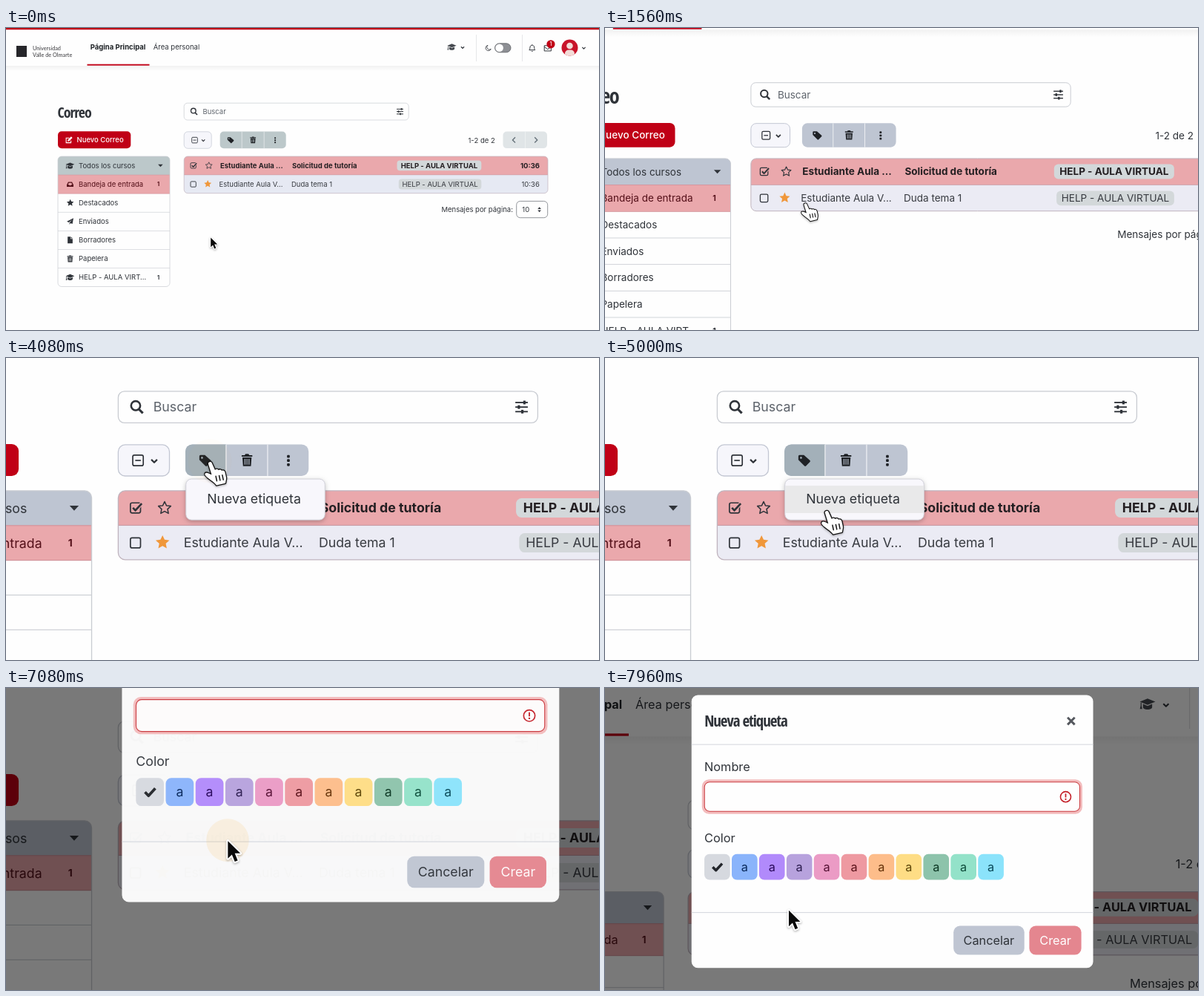
An HTML page with a canvas for the animation above (8 s loop, 800 by 407 pixels).

```html
<!DOCTYPE html>
<html lang="es">
<head>
<meta charset="utf-8">
<title>Correo</title>
<style>
html, body { margin: 0; width: 100%; height: 100%; overflow: hidden; background: #fefefe; }
canvas { display: block; width: 800px; height: 407px; }
</style>
</head>
<body>
<canvas id="stage"></canvas>
<script>
const W = 800, H = 407, LOOP = 8000;
const canvas = document.getElementById('stage');
const ctx = canvas.getContext('2d');
const dpr = window.devicePixelRatio || 1;
canvas.width = W * dpr;
canvas.height = H * dpr;

const RED = '#c00016', INK = '#2f3339', PINK = '#eaa8ac', LINE = '#c9ccd2';
const SANS = 'Inter, "Open Sans", sans-serif';
const NARROW = '"Open Sans Condensed", "Roboto Condensed", Roboto, sans-serif';
const ROW = 25.07, TOP = 173;

// Icons on a 16 x 16 grid
const ICONS = {
  cap: 'M8 2 16.5 5.5 8 9-.5 5.5zM3 8v3.5c0 1.2 2 2.5 5 2.5s5-1.3 5-2.5V8l-5 2.2zM.4 6.5h1V10l.8 3.5H-.4L.4 10z',
  inbox: 'M3.5 2.5h9L16 9v5H0V9zM5 4.5 2.6 9h3l1 2h2.8l1-2h3L11 4.5z',
  plane: 'M16 0 13.5 14 8.8 12 6.5 15.5V11L13 3.5 5 10.2 0 8.2z',
  file: 'M2 0h7v5h5v11H2zM10 0l4 4h-4z',
  trash: 'M1 1.6h4L6 0h4l1 1.6h4v2H1zM2 4.6h12L13.2 16H2.8zM4.8 6.5v7.5h1.1V6.5zM7.4 6.5v7.5h1.1V6.5zM10.1 6.5v7.5h1.1V6.5z',
  tag: 'M0 2.5V7.2L8 15.2q1 .9 2 0L15.2 10q.9-1 0-2L7.2 1H1.5Q0 1 0 2.5zM3.5 3.2a1.3 1.3 0 1 1-.01 0z',
  edit: 'M1 3h7.5v1.7H2.7v8.6h8.6V9.5H13V15H1zM12.6.8 15.4 3.6 8.4 10.6 5 11.2 5.6 7.8z',
  moon: 'M7 1a7 7 0 1 0 8 9.5A6 6 0 0 1 7 1z',
  bell: 'M8 1v1.2M2 12c2-2 1.3-5 2-7 .6-1.8 2-2.8 4-2.8s3.4 1 4 2.8c.7 2 0 5 2 7zM6.5 14c.5 1.3 2.5 1.3 3 0',
  mail: 'M1 3h14v11H1zM1 5.5l7 5 7-5',
  check: 'M2 8.5 6.3 13 14.5 4'
};
for (const k in ICONS) ICONS[k] = new Path2D(ICONS[k]);

const ARROW = new Path2D('M.2.6V13.2L3.100 10.400 5.200 15.500 7.300 14.600 5.200 9.500H9.200z');
const HAND = new Path2D('M-1.1 2.2C-1.5.7.7-.1 1.4 1.3L3.7 6.4C4.5 5.5 5.8 5.7 6.2 6.6 6.9 5.8 8.2 6 8.6 7 9.5 6.4 10.6 6.9 10.9 8L11.700 11.500C12 13.100 11.400 14.200 11.200 15.900L4.800 17.400C3.500 15.500.9 14.100-1.300 12.200-2.700 11-4.100 9.800-3.400 8.800-2.600 7.800-.9 8.800 1.300 9.800z');
const FINGERS = new Path2D('M4.300 10.900 5 14.300M6.700 10.500 7.400 13.900M9 10.100 9.700 13.500');

const clamp = v => Math.max(0, Math.min(1, v));
const ease = v => { v = clamp(v); return v * v * (3 - 2 * v); };
const mix = (a, b, p) => a + (b - a) * p;
const mixAll = (a, b, p) => a.map((v, i) => mix(v, b[i], p));

function text(str, x, y, { size = 9.5, weight = 400, color = INK, align = 'left', font } = {}) {
  ctx.font = font || `${weight} ${size}px ${SANS}`;
  ctx.textAlign = align;
  ctx.fillStyle = color;
  ctx.fillText(str, x, y);
}
function title(str, x, y, size) {
  ctx.letterSpacing = -size * 0.05 + 'px';
  text(str, x, y, { font: `400 ${size}px ${NARROW}` });
  ctx.letterSpacing = '0px';
}
function box(x, y, w, h, r, fill, stroke, lw = 0.7) {
  ctx.beginPath();
  ctx.roundRect(x, y, w, h, r);
  if (fill) { ctx.fillStyle = fill; ctx.fill(); }
  if (stroke) { ctx.strokeStyle = stroke; ctx.lineWidth = lw; ctx.stroke(); }
}
function rect(x, y, w, h, fill) {
  ctx.fillStyle = fill;
  ctx.fillRect(x, y, w, h);
}
function disc(x, y, r, fill) {
  ctx.beginPath();
  ctx.arc(x, y, r, 0, 7);
  ctx.fillStyle = fill;
  ctx.fill();
}
function line(pts, color = INK, lw = 1) {
  ctx.beginPath();
  for (let i = 0; i < pts.length; i += 2) ctx.lineTo(pts[i], pts[i + 1]);
  ctx.strokeStyle = color;
  ctx.lineWidth = lw;
  ctx.stroke();
}
function icon(name, x, y, size, color = INK, lw = 0) {
  ctx.save();
  ctx.translate(x - size / 2, y - size / 2);
  ctx.scale(size / 16, size / 16);
  ctx.fillStyle = ctx.strokeStyle = color;
  ctx.lineWidth = lw;
  if (lw) ctx.stroke(ICONS[name]);
  else ctx.fill(ICONS[name], 'evenodd');
  ctx.restore();
}
function star(x, y, r, fill, stroke) {
  ctx.beginPath();
  for (let i = 0; i < 10; i++) {
    const a = i * Math.PI / 5 - Math.PI / 2, d = i % 2 ? r * 0.48 : r;
    ctx.lineTo(x + d * Math.cos(a), y + d * Math.sin(a));
  }
  ctx.closePath();
  ctx.lineJoin = 'round';
  if (fill) { ctx.fillStyle = fill; ctx.fill(); }
  if (stroke) { ctx.strokeStyle = stroke; ctx.lineWidth = 0.8; ctx.stroke(); }
}
const chevron = (x, y, r = 2.1) => line([x - r, y - r / 2, x, y + r / 2, x + r, y - r / 2], INK, 1.2);
function triangle(x, y, w, h, color = INK) {
  ctx.beginPath();
  ctx.moveTo(x - w / 2, y - h / 2);
  ctx.lineTo(x + w / 2, y - h / 2);
  ctx.lineTo(x, y + h / 2);
  ctx.fillStyle = color;
  ctx.fill();
}

function drawHeader() {
  const g = ctx.createLinearGradient(0, 51, 0, 58);
  g.addColorStop(0, 'rgba(0,0,0,.05)');
  g.addColorStop(1, 'rgba(0,0,0,0)');
  rect(0, 51, W, 7, g);
  rect(0, 0, W, 2.2, RED);

  rect(14, 24, 14, 15, '#26262a');
  const small = { font: '400 7.3px Lato, sans-serif', color: '#3a3a3e' };
  text('Universidad', 36, 30.3, small);
  text('Valle de Olmarte', 36, 39.3, small);

  text('Página Principal', 113.7, 29, { weight: 700, color: '#1d2125' });
  text('Área personal', 198.7, 29);
  rect(109.5, 48.7, 84, 1.9, RED);

  icon('cap', 601.5, 25.5, 11.5, '#45494f');
  chevron(616, 26.3);
  rect(634.2, 9, 0.7, 36, '#dcdde0');
  rect(696.2, 9, 0.7, 36, '#dcdde0');
  icon('moon', 650.5, 27, 8.5, INK, 1.5);
  box(659.5, 20.8, 21.5, 12, 6, '#8d8f94', '#5b5e63', 0.8);
  disc(665.6, 26.8, 5.3, '#fff');
  icon('bell', 709.8, 27, 10.5, INK, 1.5);
  icon('mail', 730.8, 27, 10.5, INK, 1.5);
  disc(735, 21.8, 5.6, RED);
  text('1', 735, 24.4, { size: 7, weight: 500, color: '#fff', align: 'center' });

  disc(760.5, 26.5, 11, '#c8142a');
  ctx.save();
  ctx.beginPath();
  ctx.arc(760.5, 26.5, 11, 0, 7);
  ctx.clip();
  disc(760.5, 24, 4.3, '#f3dcd8');
  box(754, 29.5, 13, 12, 5, '#f3dcd8');
  ctx.restore();
  chevron(779.5, 27);
}

function drawSidebar(tone) {
  const items = [
    ['cap', 'Todos los cursos'], ['inbox', 'Bandeja de entrada', '1'], ['star', 'Destacados'],
    ['plane', 'Enviados'], ['file', 'Borradores'], ['trash', 'Papelera'],
    ['cap', 'HELP - AULA VIRT...', '1']
  ];
  box(70, TOP, 151, ROW * 7, 5, '#fefefe');
  box(70, TOP, 151, ROW, [5, 5, 0, 0], tone);
  rect(70, TOP + ROW, 151, ROW, PINK);
  items.forEach(([name, label, count], i) => {
    const y = TOP + ROW * (i + 0.5), color = i === 1 ? '#541019' : INK;
    if (i) rect(70, y - ROW / 2 - 0.3, 151, 0.6, i < 3 ? '#d18f97' : LINE);
    if (name === 'star') star(86.7, y, 5, color);
    else icon(name, 86.5, y, name === 'cap' ? 11 : 9, color);
    text(label, 98, y + 3.4, { color });
    if (count) text(count, 205.6, y + 2.7, { size: 7.4, weight: 700, color, align: 'center' });
  });
  triangle(208.4, TOP + ROW / 2, 6.6, 3.6);
  box(70, TOP, 151, ROW * 7, 5, null, LINE);
}

function drawToolbar(tone, pressed) {
  box(240.2, 101.2, 303, 22.8, 4.5, '#fefefe', LINE);
  ctx.beginPath();
  ctx.arc(252.8, 111.6, 3.3, 0, 7);
  ctx.strokeStyle = INK;
  ctx.lineWidth = 1.4;
  ctx.stroke();
  line([255, 114, 258, 117], INK, 1.7);
  text('Buscar', 265.5, 116, { color: '#5d636b' });
  [[109.3, 2], [112.6, -2], [115.9, 0.5]].forEach(([y, d]) => {
    line([527, y, 536, y], INK, 1);
    rect(530.7 + d, y - 1.3, 1.7, 2.6, INK);
  });

  box(70, 139.3, 98.3, 23, 5, RED);
  icon('edit', 85, 150.8, 10, '#fff');
  text('Nuevo Correo', 95.5, 154.4, { weight: 500, color: '#fff' });

  box(240.2, 139.8, 37, 22.5, 5, '#f6f6fb', '#c3c7d3');
  box(250.7, 147.3, 7.6, 7.6, 1.2, null, INK, 0.9);
  line([252.5, 151.1, 256.5, 151.1], INK, 0.9);
  chevron(266.2, 151.5);

  box(288.7, 139.6, 89, 22.7, 5, tone);
  if (pressed) box(288.7, 139.6, 29.4, 22.7, [5, 0, 0, 5], '#a3b0b9');
  rect(317.8, 139.6, 0.6, 22.7, '#f4f5f7');
  rect(347.8, 139.6, 0.6, 22.7, '#f4f5f7');
  icon('tag', 303.2, 151.1, 8.8, '#1f2226');
  icon('trash', 333.2, 150.8, 8.8, '#1f2226');
  for (const d of [-3, 0, 3]) box(362.1, 150.2 + d, 2, 2, 0.6, '#1f2226');

  text('1-2 de 2', 623.5, 154.5);
  box(670.5, 139.5, 59.5, 22.6, 5, '#e0e5e7');
  rect(700, 139.5, 0.6, 22.6, '#f4f5f7');
  line([687, 147.3, 683.4, 150.9, 687, 154.5], '#66727a', 1.4);
  line([713.2, 147.3, 716.8, 150.9, 713.2, 154.5], '#66727a', 1.4);
}

function drawTable(early) {
  const h = 49.7, mid = 197.9;
  box(240.2, TOP, 490.8, mid - TOP, [5, 5, 0, 0], PINK);
  box(240.2, mid, 490.8, TOP + h - mid, [0, 0, 5, 5], early ? '#e6e9f3' : '#ebebf4');
  rect(240.2, mid - 0.3, 490.8, 0.6, '#c79aa3');
  box(240.2, TOP, 490.8, h, 5, null, '#c0b4be');

  const rows = [
    { y: 185.3, who: ['Estudiante Aula ...', 289], what: ['Solicitud de tutoría', 386], tagX: 527.5, hour: 694, weight: 700, color: '#241f22' },
    { y: 210.5, who: ['Estudiante Aula V...', 287.5], what: ['Duda tema 1', 385], tagX: 529.8, hour: 695.5, weight: 400, color: '#383b41' }
  ];
  rows.forEach((r, i) => {
    box(249, r.y - 3.6, 7.3, 7.3, 1.2, null, INK, 0.9);
    if (i === 0) {
      const tick = [250.8, 185.2, 252.6, 187.2, 257.2, 182.2];
      line(tick, PINK, 2.6);
      line(tick, INK, 1.4);
      star(273.7, r.y + 0.2, 4.7, null, INK);
    } else star(272.2, r.y - 0.2, 5.2, '#f0973a');
    const style = { weight: r.weight, color: r.color }, base = r.y + 3.3;
    text(...r.who, base, style);
    text(...r.what, base, style);
    box(r.tagX, r.y - 6.9, 641.3 - r.tagX, 13.9, 4, '#d3d8da');
    text('HELP - AULA VIRTUAL', (r.tagX + 641.3) / 2, base, { ...style, align: 'center' });
    text('10:36', r.hour, base, style);
  });

  text('Mensajes por página:', 587.5, 248.2);
  box(688.7, 233.4, 42, 22.3, 5, '#fefefe', '#777b82', 0.8);
  text('10', 696.3, 248.2);
  triangle(719.6, 242.6, 4.6, -2.8);
  triangle(719.6, 246.8, 4.6, 2.8);
}

function shadow(color, blur, y) {
  ctx.shadowColor = color;
  ctx.shadowBlur = blur * dpr;
  ctx.shadowOffsetY = y * dpr;
}

function drawMenu(hover) {
  ctx.save();
  shadow('rgba(0,0,0,.28)', 6, 2);
  box(289.1, 164.5, 100.4, 29.5, 4, '#f8f7fc');
  ctx.restore();
  box(289.1, 164.5, 100.4, 29.5, 4, null, '#cfcfd8', 0.5);
  if (hover) rect(289.4, 169.3, 99.8, 19.8, '#e9e9ea');
  text('Nueva etiqueta', 304.3, 182.3);
}

function drawTooltip() {
  ctx.save();
  shadow('rgba(0,0,0,.4)', 4, 1);
  rect(307.5, 161.3, 35.9, 10.6, '#3b3b3d');
  ctx.restore();
  text('Etiquetas', 311.2, 168.7, { size: 6.3, weight: 500, color: '#ececec' });
}

const SWATCHES = ['#d6d9df', '#8ab4fb', '#b18afb', '#b7a2dd', '#eb9bc5', '#ee99a1',
  '#fdbd8a', '#fedd85', '#8dc3ab', '#93e2c9', '#8be3fb'];
const LETTERS = ['', '#0a2a5c', '#2a0a5c', '#2c1d4f', '#561235', '#5a131b',
  '#65330a', '#5c4508', '#0c3623', '#0f4d3b', '#0a4a5a'];

function drawModal(p) {
  ctx.save();
  ctx.globalAlpha = p;
  ctx.translate(0, -31.6 * (1 - p));
  box(242.9, 18.5, 315.8, 214.3, 5, '#fefefe');
  title('Nueva etiqueta', 253.1, 43, 12.2);
  line([538.6, 36.1, 544.2, 41.7], '#55585e', 1.7);
  line([544.2, 36.1, 538.6, 41.7], '#55585e', 1.7);
  rect(242.9, 57, 315.8, 0.6, '#d4d7de');
  rect(242.9, 189, 315.8, 0.6, '#d4d7de');

  text('Nombre', 253, 78);
  box(251.1, 84.8, 299.1, 27, 5.5, '#f3bcbd');
  box(253.1, 86.8, 295.1, 23, 4, '#fefefe', '#c9383d', 0.6);
  ctx.beginPath();
  ctx.arc(537.1, 98.4, 4.1, 0, 7);
  ctx.strokeStyle = '#c41f28';
  ctx.lineWidth = 0.9;
  ctx.stroke();
  rect(536.6, 95.9, 1, 3, '#c41f28');
  disc(537.1, 100.3, 0.65, '#c41f28');

  text('Color', 253, 134.4);
  SWATCHES.forEach((c, i) => {
    const x = 253 + i * 21.52;
    box(x, 143.3, 20.2, 20.3, 4, c);
    if (i) text('a', x + 10.1, 156.6, { color: LETTERS[i], align: 'center' });
    else icon('check', x + 10.1, 153.2, 9.5, '#23262b', 3.4);
  });

  box(448.9, 199.8, 55.7, 22.7, 5, '#bfc5d2');
  text('Cancelar', 476.7, 214.6, { align: 'center' });
  box(508.5, 199.8, 40.9, 22.7, 5, '#e4868f');
  text('Crear', 529, 214.6, { color: '#fff', align: 'center' });
  ctx.restore();
}

const REST = [276, 282], TAG = [306.4, 151.6], ITEM = [319.2, 187];
const CLICKS = [[3560, TAG], [6640, ITEM]];
const TIP_ON = 2520, MENU_ON = 3720, MODAL_ON = 6840;

function pointer(t) {
  if (t < 4700) return mixAll(REST, TAG, ease((t - 1056) / 990));
  return mixAll(TAG, ITEM, ease((t - 4700) / 310));
}

// Camera as [scale, x, y]
const WIDE = [1, 0, 0], CLOSE = [1.868, -297.3, -144.2], DIALOG = [1.688, -300.5, 0];
function camera(t) {
  if (t < 7000) return mixAll(WIDE, CLOSE, ease((t - 1074) / 990));
  return mixAll(CLOSE, DIALOG, ease((t - 7284) / 900));
}

function drawRipple(t) {
  for (const [start, [x, y]] of CLICKS) {
    const u = (t - start) / 540;
    if (u < 0 || u > 1) continue;
    ctx.globalAlpha = u < 0.08 ? 1 : 0.6 * (1 - u);
    disc(x, y, 1.4 + 14.5 * (1 - (1 - u) ** 2), '#f5a623');
    ctx.globalAlpha = 1;
  }
}

function drawPointer([x, y], hand) {
  ctx.save();
  ctx.translate(x, y);
  ctx.lineJoin = ctx.lineCap = 'round';
  shadow('rgba(0,0,0,.3)', 3, 1.2);
  ctx.lineWidth = hand ? 1.4 : 2.2;
  ctx.strokeStyle = hand ? '#111' : '#fff';
  ctx.stroke(hand ? HAND : ARROW);
  ctx.shadowColor = 'transparent';
  ctx.fillStyle = hand ? '#fff' : '#0a0a0a';
  ctx.fill(hand ? HAND : ARROW);
  if (hand) {
    ctx.lineWidth = 0.8;
    ctx.stroke(FINGERS);
  }
  ctx.restore();
}

function draw(t) {
  const [s, cx, cy] = camera(t), pos = pointer(t), y = pos[1];
  const early = t < 1080, tone = early ? '#bcc8ca' : '#bec5d2';
  const menu = t >= MENU_ON && t < MODAL_ON, modal = t >= MODAL_ON;
  const onTag = y < 162.3, onItem = menu && y > 169.3, onRow = !menu && y > TOP && y < 222.7;

  ctx.setTransform(dpr, 0, 0, dpr, 0, 0);
  rect(0, 0, W, H, '#fefefe');
  ctx.setTransform(dpr * s, 0, 0, dpr * s, dpr * cx, dpr * cy);
  drawHeader();
  title('Correo', 69.5, 121, 19.8);
  drawToolbar(tone, onTag || menu);
  drawSidebar(tone);
  drawTable(early);
  if (menu) drawMenu(onItem);
  if (t >= TIP_ON && t < 3600) drawTooltip();
  if (modal) {
    rect(-50, -50, 900, 600, `rgba(0,0,0,${0.52 * clamp((t - MODAL_ON) / 150)})`);
    const k = clamp((t - MODAL_ON) / 300);
    drawModal(1 - (1 - k) ** 2);
  }
  drawRipple(t);
  drawPointer(pos, !modal && (onTag || onItem || onRow));
}

function frame() {
  draw(performance.now() % LOOP);
  requestAnimationFrame(frame);
}
frame();
</script>
</body>
</html>
```
